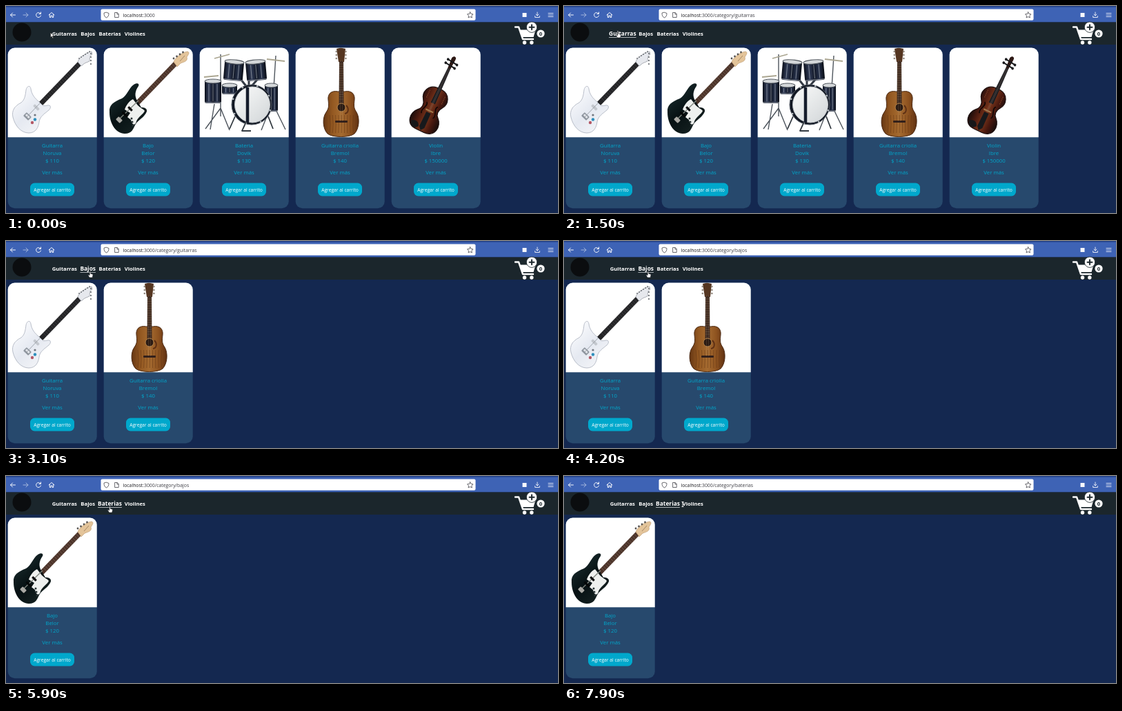
Animation, 800 px wide and 300 px high, one loop 8 s. Source, as an HTML page with a canvas:

```html
<!DOCTYPE html>
<html lang="es">
<head>
<meta charset="utf-8">
<title>Tienda de instrumentos</title>
<style>
html, body { margin: 0; width: 100%; height: 100%; overflow: hidden; background: #142850; }
canvas { display: block; width: 800px; height: 300px; }
</style>
</head>
<body>
<canvas id="stage" width="800" height="300"></canvas>
<script>
const ctx = document.getElementById('stage').getContext('2d');
const LOOP = 8000;
const FONT = '"Open Sans", "Noto Sans", sans-serif';

// Art is drawn in the coordinates of the leftmost card.
const PRODUCTS = [
  { name: 'Guitarra', brand: 'Noruva', price: 110, art: electricGuitar },
  { name: 'Bajo', brand: 'Belor', price: 120, art: bass },
  { name: 'Bateria', brand: 'Dovik', price: 130, art: drums },
  { name: 'Guitarra criolla', brand: 'Bremol', price: 140, art: acousticGuitar },
  { name: 'Violin', brand: 'Ibre', price: 150000, art: violin }
];
const NAV = [
  { label: 'Guitarras', x: 84.8 },
  { label: 'Bajos', x: 118.7 },
  { label: 'Baterias', x: 150.5 },
  { label: 'Violines', x: 186.8 }
];

// Each row is [start time, value...] and holds until the next row.
const SHELF = [[0, [0, 1, 2, 3, 4]], [3100, [0, 3]], [5900, [1]]];
const ROUTE = [[0, ''], [1100, '/category/guitarras'], [4000, '/category/bajos'], [6500, '/category/baterias']];
const HOVER = [[0, -1], [100, 0], [1800, 1], [5600, 2]];
const POINTER = [
  [0, 'arrow', 64.5, 38.5], [100, 'hand', 70, 38], [200, 'hand', 82, 38], [300, 'hand', 88, 37.5],
  [500, 'hand', 78.5, 37], [1800, 'hand', 110, 43], [1900, 'hand', 119, 46],
  [2100, 'hand', 124, 50], [2200, 'hand', 122, 44], [5600, 'hand', 140, 46],
  [5700, 'hand', 149.5, 45.5], [5900, 'hand', 150.5, 44],
  [7500, 'hand', 152, 43], [7900, 'beam', 172, 41]
];
const at = (rows, t) => rows.findLast(row => row[0] <= t);

function shape(d, fill, stroke, width = 1) {
  const path = new Path2D(d);
  if (fill) { ctx.fillStyle = fill; ctx.fill(path); }
  if (stroke) { ctx.strokeStyle = stroke; ctx.lineWidth = width; ctx.stroke(path); }
}
function oval(x, y, rx, ry, fill, stroke, width = 1) {
  ctx.beginPath();
  ctx.ellipse(x, y, rx, ry, 0, 0, Math.PI * 2);
  if (fill) { ctx.fillStyle = fill; ctx.fill(); }
  if (stroke) { ctx.strokeStyle = stroke; ctx.lineWidth = width; ctx.stroke(); }
}
function rect(x, y, w, h, fill, r = 0) {
  ctx.fillStyle = fill;
  ctx.beginPath();
  ctx.roundRect(x, y, w, h, r);
  ctx.fill();
}
function text(str, x, y, size, fill, align = 'center', weight = 500) {
  ctx.font = `${weight} ${size}px ${FONT}`;
  ctx.textAlign = align;
  ctx.fillStyle = fill;
  ctx.fillText(str, x, y);
  return ctx.measureText(str).width;
}
function blend(x0, y0, x1, y1, ...colors) {
  const g = ctx.createLinearGradient(x0, y0, x1, y1);
  colors.forEach((c, i) => g.addColorStop(i / (colors.length - 1), c));
  return g;
}
function placed(x, y, angle, draw) {
  ctx.save();
  ctx.translate(x, y);
  ctx.rotate(angle * Math.PI / 180);
  draw();
  ctx.restore();
}

function longNeck(color, fret) {
  shape('M48 139L104 81L109 86L53 144Z', color);
  for (let i = 0; i < 19; i++) {
    const k = i / 19, x = 54 + 50 * k, y = 133 - 52 * k;
    shape(`M${x} ${y}l5 5`, null, fret, .4);
  }
}

function electricGuitar() {
  longNeck('#242426', '#66666a');
  shape('M104 81C106 75 114 69 124 66L125 70C120 73 122 76 121 80L114 83L109 87Z', '#e6e8ed', '#8f939b', .7);
  for (let i = 0; i < 6; i++) oval(106 + i * 3, 76 - i * 2, 1, 1, '#6f7378');
  for (let i = 0; i < 4; i++) oval(123, 69 + i * 5, 1.1, 1.1, '#60646a');
  shape('M47 138C42 134 37 128 36 120C35 114 30 116 29 122C28 130 27 136 22 140C12 145 8 152 10 161C13 174 22 184 33 184C43 184 47 176 48 168C49 160 56 156 62 151C66 147 65 143 60 144C56 145 54 145 52 143Z',
    blend(14, 130, 58, 176, '#f8f9fc', '#e5e9f1', '#f4f5f8'), '#a9afbb', .8);
  placed(44, 147, 45, () => rect(-5, -2, 10, 4, '#c4c8ce', 1));
  placed(31, 160, 45, () => { rect(-5, -3.5, 10, 7, '#8f969f', 1); rect(-3.5, -2, 7, 3, '#e0e3e8', 1); });
  shape('M30 161L50 140', null, '#8f949b', .8);
  oval(42, 158, 1.6, 1.6, '#70747c');
  oval(42, 164.5, 2.2, 2.2, '#2f8fbd');
  oval(38, 169, 2.2, 2.2, '#b35866');
}

function bass() {
  longNeck('#4c342a', '#a18a79');
  shape('M104 81C106 75 116 67 124 66C128 67 125 71 123 74C125 80 119 81 114 83L109 88Z', '#e3c49a', '#b99468', .6);
  for (let i = 0; i < 4; i++) oval(104 + i * 4.5, 76 - i * 3, 1.4, 1.4, '#565452');
  shape('M113 80L120 72', null, '#7d6141', .6);
  shape('M51 137C47 130 48 123 53 116C55 112 50 111 46 114C39 119 37 129 29 134C17 139 10 143 11 154C11 171 21 185 33 185C44 185 45 178 49 171C53 165 62 161 65 153C66 148 61 147 57 147Z',
    blend(15, 130, 55, 175, '#17282a', '#071113', '#142020'));
  shape('M45 135C39 138 35 144 33 150L41 155L37 161L42 165C44 174 49 173 50 167C53 160 60 157 62 152C60 149 56 148 52 144Z', '#eef0ee');
  shape('M25 164L53 137', null, '#80867f', 1.3);
  placed(41, 149, 45, () => rect(-4, -1.7, 8, 3.4, '#111', 1));
  placed(33, 157, 45, () => rect(-5, -1.5, 10, 3, '#050808', 1));
  placed(25, 165, 45, () => rect(-4, -3, 8, 6, '#aaa9a4', 1));
  for (let i = 0; i < 3; i++) oval(43 + i, 163 + i * 5, 1.5, 1.5, '#283233');
}

function drum(x, y, w, h, tilt) {
  placed(x + w / 2, y + h / 2, tilt, () => {
    const l = -w / 2, t = -h / 2;
    rect(l, t, w, h, blend(l, 0, -l, 0, '#0c101b', '#323d59', '#111726', '#28334d', '#080c14'), 3);
    oval(0, t + 2, w / 2, 3, '#d4d7d9', '#50565d', 1);
    for (let i = 1; i < 4; i++) shape(`M${l + w * i / 4} ${t + 6}v${h - 9}`, null, '#8d949c', .8);
    shape(`M${l} ${-t - 1}h${w}`, null, '#9ea2a8', 1);
  });
}

function drums() {
  const metal = '#4d545c';
  const stands = 'M33 70V160M33 148L11 178M33 148L46 180M113 72L108 150M108 140L92 180M108 140L127 179M24 142L18 179';
  shape(stands, null, metal, 1.4);
  shape('M24 76L46 70M100 77L126 80M9 103L30 101', null, '#aba691', 1.8);
  shape('M58 101L70 116M92 100L78 116M70 92H74V118', null, '#343b45', 3);
  drum(10, 107, 24, 34, 0);
  drum(35, 113, 22, 15, 0);
  drum(97, 113, 19, 40, 0);
  drum(38, 79, 28, 29, 5);
  drum(70, 79, 29, 29, -5);
  oval(78, 143, 29, 29, '#111722', '#555c66', 1);
  oval(79, 143, 25.5, 26, blend(60, 125, 100, 165, '#f5f6f6', '#d5d9db'), '#bfc3c7', 1);
  shape('M72 118V169', null, '#151c2b', 4.5);
  for (let i = 0; i < 8; i++) {
    const a = i * Math.PI / 4 + .3;
    oval(78 + 28 * Math.cos(a), 143 + 28 * Math.sin(a), 1.3, 1.3, '#b8bec2');
  }
  shape('M54 160L46 178M102 160L109 178M70 168L64 181H77', null, '#343b42', 1.8);
}

function acousticGuitar() {
  shape('M62 62L68 60.5L75 62L73 81H65Z', '#553621');
  for (let y = 66; y < 80; y += 5) {
    oval(61.8, y, 1.3, 1.3, '#8f867c');
    oval(75.4, y, 1.3, 1.3, '#8f867c');
  }
  shape('M64 124C54 122 49 128 50 136C51 145 51 148 47 154C41 162 42 178 49 185C56 191 81 191 88 185C95 178 96 162 91 154C87 148 87 145 88 136C89 128 84 122 74 124Z',
    blend(43, 0, 95, 0, '#653613', '#935821', '#a66c31', '#8d521f', '#5b2e11'), '#4a2914', 1);
  for (let i = 0; i < 9; i++) shape(`M${52 + i * 4.3} 158Q${54 + i * 3.9} 173 ${52 + i * 4.3} 184`, null, '#5f321388', .9);
  shape('M66 80H72L72.5 142H65.5Z', '#3c281e');
  for (let i = 0; i < 16; i++) shape(`M66 ${84 + i * 3.4}h6`, null, '#8f775c', .35);
  oval(69, 147, 6, 6, '#2b1b13', '#b3824a', 1);
  shape('M76 144C80 148 80 155 74 156', null, '#5e3014', 2);
  rect(60, 166, 18, 3, '#33201a', 1);
  shape('M67.5 79V167M70.5 79V167', null, '#c0a98b55', .5);
}

function violin() {
  placed(45, 179, 25, () => {
    const body = blend(-22, 0, 22, 0, '#170c0b', '#4d1b10', '#79351a', '#47180f', '#150b0a');
    shape('M-6 2C-24 2 -25 -17 -16 -25C-11 -29 -11 -36 -15 -41C-22 -50 -17 -64 -4 -65H4C17 -64 22 -50 15 -41C11 -36 11 -29 16 -25C25 -17 24 2 6 2Z', body, '#1d1010', 1.2);
    for (const s of [-1, 1]) {
      shape(`M${s * 9} -40C${s * 3} -36 ${s * 14} -27 ${s * 9} -22`, null, '#0d0605', 1.5);
      for (let i = 0; i < 5; i++) oval(s * 12, -57 + i * 2.6, .8, .8, '#7d4328');
    }
    shape('M-3.5 -27L3.5 -27L4 -4L0 1L-4 -4Z', '#17191c');
    shape('M-18 -7Q-8 -12 -5 -3L-9 1Q-18 1 -18 -7Z', '#171719');
    rect(-6, -31, 12, 2, '#a57c4d');
    shape('M-3.5 -42L-2 -101H2L3.5 -42Z', '#1b1c20');
    shape('M-2 -98L-3 -112C-3 -118 4 -118 3 -112L2 -98Z', '#2e1915');
    shape('M-8 -103L7 -101M-7 -109L8 -107', null, '#141619', 2);
    for (const [x, y] of [[-8, -103], [7, -101], [-7, -109], [8, -107]]) oval(x, y, 1.9, 1.9, '#191a1d');
    shape('M-.8 -28V-98M.8 -28V-98', null, '#7c6a62', .4);
  });
}

function card(product, slot) {
  ctx.save();
  ctx.translate(slot * 139, 0);
  ctx.save();
  ctx.beginPath();
  ctx.roundRect(2.7, 60.5, 129, 232.7, 10);
  ctx.clip();
  rect(2, 60, 130, 234, '#27496d');
  rect(2, 60, 130, 130.3, '#fff');
  product.art();
  ctx.restore();
  [product.name, product.brand, `$ ${product.price}`, 'Ver más'].forEach((line, i) =>
    text(line, 67, [204.7, 216, 227.2, 243.6][i], 7.8, '#00a8cc'));
  rect(35, 256.5, 64, 19, '#00a8cc', 6.5);
  text('Agregar al carrito', 67, 268.8, 6.7, '#fff');
  ctx.restore();
}

function browserBar(route) {
  rect(0, 0, 800, 23.5, '#3e63b5');
  rect(0, 0, 800, 1.5, '#213f86');
  rect(137.5, 4.5, 543, 16.3, '#fff', 2);
  ctx.lineCap = ctx.lineJoin = 'round';
  shape('M13.5 13H6.5M9.5 10L6.5 13L9.5 16', null, '#f5f7fc', 1);
  shape('M25 13H32M29 10L32 13L29 16', null, '#a3b5dc', 1);
  shape('M50 11A3.5 3.5 0 1 0 50.5 14M50.5 9V11.5H48', null, '#f5f7fc', 1);
  shape('M62 13L66 9.5L70 13M63.3 12.5V16.5H65V14H67V16.5H68.7V12.5', null, '#f5f7fc', 1);
  shape('M145.5 9.3L149 10.5C149 14 148 15.8 145.5 17C143 15.8 142 14 142 10.5Z', null, '#45454c', .8);
  shape('M158 9.5H161.2L163.2 11.5V16.5H158ZM161 9.5V12H163', null, '#45454c', .8);
  shape('M672.7 8.8L674 11.5L677 11.9L674.8 14L675.3 17L672.7 15.6L670 17L670.6 14L668.4 11.9L671.4 11.5Z', null, '#45454c', .8);
  rect(748.5, 10, 6, 6, '#f5f7fc');
  shape('M770 9V14M768 12L770 14L772 12M766.7 14.5V16.5H773.3V14.5', null, '#f5f7fc', .9);
  shape('M793 10.5H799M793 13H799M793 15.5H799'.replace(/79([39])/g, (_, d) => d === '3' ? 786 : 793), null, '#f5f7fc', .8);
  const hostWidth = text('localhost', 169.5, 15.7, 6.85, '#17171c', 'left');
  text(':3000' + route, 169.5 + hostWidth, 15.7, 6.85, '#3c3c43', 'left');
}

function header(hovered) {
  rect(0, 23.5, 800, 32.5, '#1b262c');
  oval(23, 38, 13.5, 13.5, '#0b0d0f');
  NAV.forEach(({ label, x }, i) => {
    const on = i === hovered;
    const width = text(label, x, on ? 43.2 : 43, on ? 8.4 : 7.7, '#fff', 'center', 700);
    if (on) rect(x - width / 2, 45.3, width, .7, '#dce1e4');
  });
  shape('M738 30.5H743L749 48H764', null, '#fff', 2.4);
  shape('M744 34.5H767.5L764.5 45H748Z', '#fff');
  oval(751.5, 53, 2.7, 2.7, '#fff');
  oval(761.8, 53, 2.7, 2.7, '#fff');
  oval(762, 30.7, 7.7, 7.7, '#fff', '#1b262c', .8);
  shape('M762 27.2V34.2M758.5 30.7H765.5', null, '#1b262c', 1.9);
  oval(775, 40, 5.6, 5.6, '#fff');
  text('0', 775, 42.8, 7.7, '#1b262c', 'center', 700);
}

function pointer(kind, x, y) {
  ctx.save();
  ctx.translate(x, y);
  if (kind === 'arrow') shape('M0 0V7L1.7 5.5L3 8.3L4.1 7.8L2.9 5.1H5.1Z', '#fff', '#111', .6);
  if (kind === 'hand') shape('M-.8 .6Q0 -.6 .8 .6V3.4L3.5 4.1Q4.2 4.4 3.9 6L3.2 9H-.9L-3 5.7Q-2.6 4.5 -.8 5.7Z', '#fff', '#1a1c20', .6);
  if (kind === 'beam') shape('M-1.5 -3.5H1.5M0 -3.5V3.5M-1.5 3.5H1.5', null, '#fff', .9);
  ctx.restore();
}

function draw(t) {
  rect(0, 0, 800, 300, '#142850');
  browserBar(at(ROUTE, t)[1]);
  header(at(HOVER, t)[1]);
  ctx.lineCap = 'butt';
  at(SHELF, t)[1].forEach((id, slot) => card(PRODUCTS[id], slot));
  pointer(...at(POINTER, t).slice(1));
}

const start = performance.now();
function tick() {
  draw((performance.now() - start) % LOOP);
  requestAnimationFrame(tick);
}
tick();
</script>
</body>
</html>
```
